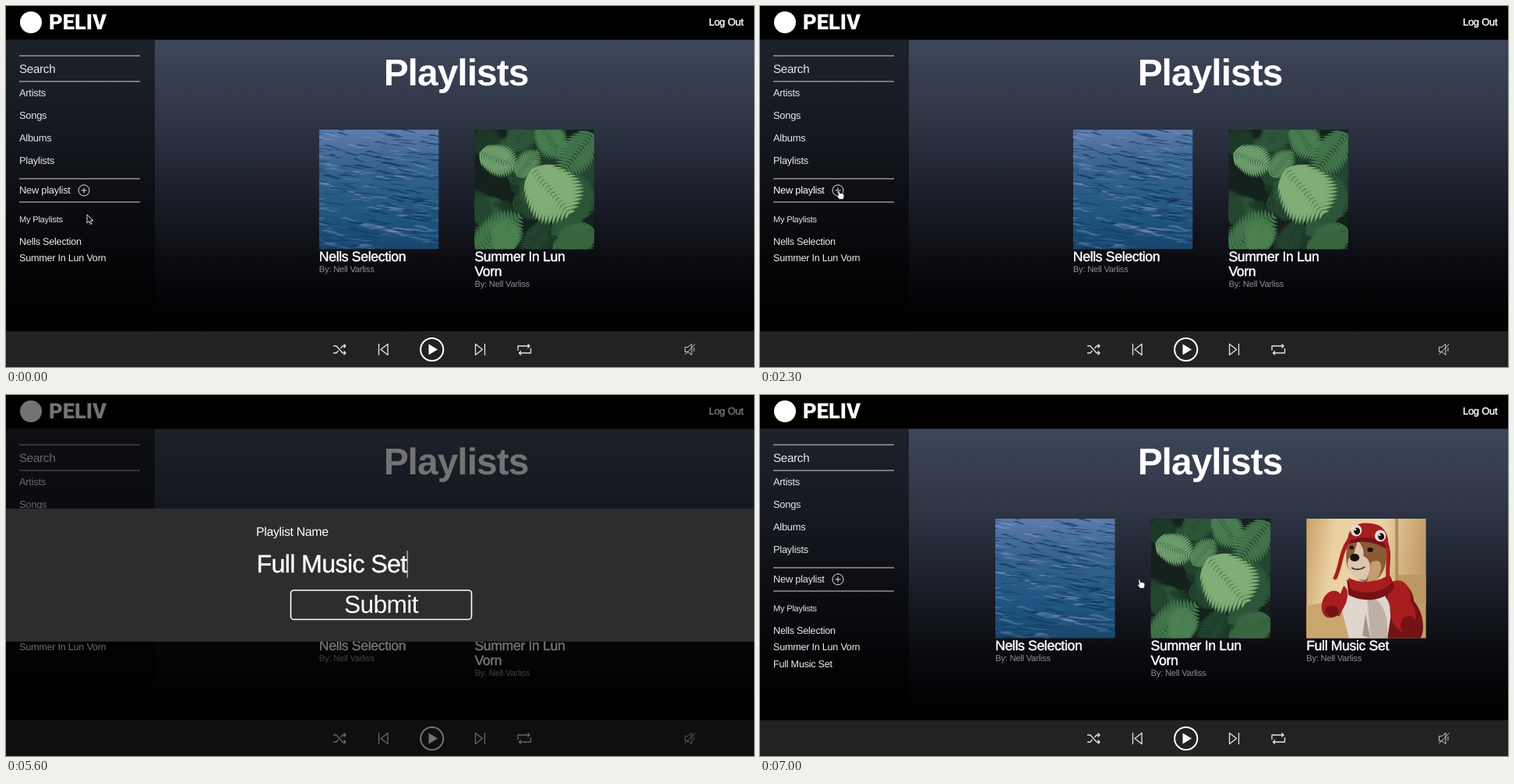
An HTML page that plays this animation: 960x464 px, repeating every 7100 ms.

```html
<!DOCTYPE html>
<html lang="en">
<head>
<meta charset="utf-8">
<title>Playlists</title>
<style>
html, body { margin: 0; width: 100%; height: 100%; overflow: hidden; background: #000; }
svg { display: block; }
text { font-family: "Liberation Sans", Arial, sans-serif; letter-spacing: -.02em; fill: #fff; white-space: pre; text-rendering: geometricPrecision; }
.nav { font-size: 12.9px; fill: #e6e6e6; }
.mine { font-size: 12.65px; fill: #ececec; }
.title { font-size: 17.65px; stroke: #fff; stroke-width: .45px; }
.by { font-size: 11.2px; fill: #8e8e91; }
.line { fill: none; stroke: #e6e6e6; stroke-width: 1.3; stroke-linejoin: round; }
</style>
</head>
<body>
<svg id="stage" width="960" height="464" viewBox="0 0 960 464"></svg>
<script>
const LOOP = 7100, OPEN = 2500, DONE = 6000;
const SIZE = 153.5;
const NAMES = ["Nells Selection", "Summer In Lun Vorn", "Full Music Set"];
const OWNER = "By: Nell Varliss";

let seed = 7;
const rnd = () => (seed = (seed * 16807) % 2147483647) / 2147483647;
const range = (n, fn) => Array.from({ length: n }, (_, i) => fn(i)).join("");
const text = (x, y, s, cls, extra = "") => `<text x="${x}" y="${y}" class="${cls}" ${extra}>${s}</text>`;
const path = (d, fill) => `<path d="${d}" fill="${fill}"/>`;
const oval = (x, y, rx, ry, fill, turn = 0) =>
  `<ellipse cx="${x}" cy="${y}" rx="${rx}" ry="${ry}" fill="${fill}" transform="rotate(${turn} ${x} ${y})"/>`;
const grad = (id, stops, attrs) => `<linearGradient id="${id}" ${attrs}>` +
  stops.map(([o, c]) => `<stop offset="${o}" stop-color="${c}"/>`).join("") + `</linearGradient>`;

// Long crooked ripples, growing larger towards the viewer
function sea() {
  const tones = ["#7f8fbd", "#123a60", "#5f7fae", "#143f66", "#0f3052", "#2d658f"];
  return `<rect width="154" height="154" fill="url(#sea)"/>` + range(300, i => {
    const y = i / 300 * 158, w = 12 + rnd() * 22 + y / 10, h = 1 + rnd() * (1.6 + y / 60);
    const x = rnd() * 180 - 30, k = (rnd() - .3) * 7;
    const tone = tones[Math.floor(rnd() * tones.length)];
    return `<path d="M${x} ${y}q${w * .2} ${-h} ${w * .5} ${k * .3}t${w * .5} ${k * .4}q${-w * .3} ${h * 1.6} ${-w * .55} ${h * .3 - k * .2}z" fill="${tone}" opacity="${(.8 - y / 480).toFixed(2)}"/>`;
  });
}

// A stem with paired, separate leaflets that taper towards the tip
function fern(x, y, turn, len, wide, fill) {
  const n = 15;
  const leaves = range(n, i => {
    const u = (i + .5) / n, size = wide * Math.pow(Math.sin(Math.PI * (.2 + u * .78)), .8);
    const t = len / n * .36, px = len * u;
    return [-1, 1].map(s =>
      `<path d="M${px - t} 0Q${px + size * .1 - t} ${s * size * .6} ${px + size * .55} ${s * size}Q${px + size * .25 + t} ${s * size * .5} ${px + t} 0"/>`).join("");
  });
  return `<g transform="translate(${x} ${y}) rotate(${turn})" fill="${fill}">${leaves}<path d="M0 0H${len}" stroke="${fill}" stroke-width="1"/></g>`;
}

function forest() {
  const back = range(30, i => fern(rnd() * 150, rnd() * 150, rnd() * 360, 38 + rnd() * 28, 15 + rnd() * 9,
    ["#24452f", "#2d5639", "#1d3a29"][i % 3]));
  return `<rect width="154" height="154" fill="#14211c"/>` + back +
    fern(152, 4, 128, 66, 25, "#41744a") + fern(84, -8, 58, 50, 22, "#477d4f") +
    fern(2, 155, -38, 72, 26, "#41744a") + fern(154, 128, 152, 50, 23, "#3a6a45") +
    fern(34, 160, -75, 46, 22, "#4b8051") + fern(100, 158, -20, 56, 22, "#38663f") +
    fern(6, 30, 20, 50, 22, "#6d9d6c") + fern(54, 60, -50, 42, 16, "#558859") +
    fern(74, 52, 48, 72, 38, "#3c6c43") + fern(73, 50, 50, 76, 39, "#82ad76");
}

function pup() {
  const red = "#a81d1e", dark = "#741216";
  const eye = (x, y) => oval(x, y, 7.2, 7.6, "#e6ddd2") + oval(x + 1, y + 1, 4, 4.4, "#15100e") + oval(x - 1, y - 1, 1.2, 1.2, "#fff");
  const feeler = d => `<path d="${d}" fill="none" stroke="${red}" stroke-width="5" stroke-linecap="round"/>`;
  return `<rect width="154" height="154" fill="url(#room)"/>` +
    path("M0 112L42 104L60 154H0Z", "#cba56e") +
    path("M114 0H118V110H114Z", "#b48b56") + path("M118 72H154V110H118Z", "#bd9662") +
    path("M104 84C118 76 136 84 138 106C152 122 152 146 146 154H92Z", dark) +
    path("M108 82C122 74 134 84 134 104L122 134L102 112Z", red) +
    path("M44 112C47 98 60 90 76 90C98 90 110 104 108 128L104 154H55Z", "#dfd6ce") +
    path("M78 100C94 102 106 116 104 154H82Z", "#bfb0a5") +
    path("M72 150L76 122L82 154Z", "#a69488") +
    path("M52 78C66 88 92 86 108 74L113 88C104 104 76 110 54 98Z", dark) +
    path("M54 76C70 84 92 82 106 72L110 82C98 96 72 98 56 90Z", red) +
    oval(33, 110, 13, 18, red, 18) + path("M21 108Q28 95 43 98L48 86Q56 92 51 108L42 126Z", red) +
    oval(33, 119, 9, 7, dark, 18) +
    oval(124, 122, 16, 25, red, -14) + oval(132, 138, 11, 13, dark, -14) +
    path("M53 30C62 22 88 20 100 32C107 48 101 68 91 78C80 85 63 81 57 67C50 62 50 48 53 30Z", "#8c5a33") +
    path("M66 28C73 36 74 42 73 48C84 52 84 66 77 78C66 81 58 74 56 66C50 58 53 50 61 45Z", "#dcc7ae") +
    path("M83 56C95 50 101 58 91 78L78 81Z", "#c39c70") +
    oval(62, 50, 6, 5, "#15100f") + oval(58, 37, 2.8, 2.6, "#1c110c") + oval(82, 40, 3.8, 3, "#1c110c") +
    `<path d="M58 63Q66 68 75 62" fill="none" stroke="#4b2c20" stroke-width="1.8"/>` +
    path("M53 31C52 12 66 3 82 6C99 7 107 19 105 38C96 28 70 24 53 31Z", red) +
    path("M55 29C72 20 93 24 104 36L105 41C94 31 70 26 54 33Z", dark) +
    feeler("M55 27C43 44 45 60 37 76") + feeler("M102 30C110 48 101 62 106 82") +
    eye(64, 15) + eye(95, 22);
}

function cover(i, art) {
  const lines = i === 1 ? ["Summer In Lun", "Vorn"] : [NAMES[i]];
  return `<g id="cover${i}"><svg width="${SIZE}" height="${SIZE}" overflow="hidden">${art}</svg>` +
    lines.map((s, k) => text(0, 169 + k * 19, s, "title")).join("") +
    text(0, 183 + (lines.length - 1) * 19, OWNER, "by") + `</g>`;
}

const sidebar = `<rect y="43.5" width="191" height="374.5" fill="#000" opacity=".52"/>` +
  [64, 97, 222, 252].map(y => `<path d="M17 ${y}H172" stroke="#d4d4d4"/>`).join("") +
  text(17, 86, "Search", "nav", `style="font-size:15.2px"`) +
  ["Artists", "Songs", "Albums", "Playlists"].map((s, i) => text(17, 116 + i * 29.1, s, "nav")).join("") +
  text(17, 241, "New playlist", "nav", `id="add"`) +
  `<circle cx="100" cy="237" r="7" class="line" style="stroke-width:1"/><path d="M96.5 237h7m-3.5-3.5v7" class="line" style="stroke-width:1"/>` +
  text(17, 278, "My Playlists", "nav", `style="font-size:11.1px"`) +
  NAMES.map((s, i) => text(17, 306.5 + i * 21.5, s, "mine", `id="mine${i}"`)).join("");

const player = `<rect y="418" width="960" height="46" fill="#222"/><g class="line">
  <path d="M420 437h4l8 9h4m-2.5-2.5l2.5 2.5-2.5 2.5M420 446h4l2.5-3m3-3l2.5-3h4m-2.5-2.5l2.5 2.5-2.5 2.5"/>
  <path d="M478.5 434v15M490 434.5v14l-9-7zM602.5 434.5v14l9-7zM614.5 434v15"/>
  <circle cx="546.7" cy="441.5" r="14.6" style="stroke-width:2;stroke:#fff"/>
  <path d="M657 443v-6h15m-2.5-2.5l2.5 2.5-2.5 2.5M673.5 440v6h-15m2.5-2.5l-2.5 2.5 2.5 2.5"/>
  <path d="M871.5 438.5h3.5l5-4v14l-5-4h-3.5zM871.5 448l13-13.5M883 439v5" style="stroke-width:1;stroke:#ccc"/></g>` +
  path("M542.5 434.5L554 441.5L542.5 448.5Z", "#fff");

const modal = `<g id="modal"><rect width="960" height="464" opacity=".55"/>
  <rect y="146" width="960" height="171" fill="#2d2d2d"/>` +
  text(321, 180.5, "Playlist Name", "", `font-size="15.85"`) +
  text(321.5, 228, "Start typing...", "", `id="hint" font-size="31.8" style="fill:#757575"`) +
  text(321.5, 228, "", "", `id="typed" font-size="32.2" stroke="#fff" stroke-width=".4"`) +
  `<rect id="caret" y="200" width="1" height="35" fill="#e8e8e8"/>
  <rect x="365.5" y="251" width="232" height="37.5" rx="4" fill="none" stroke="#fff" stroke-width="1.6"/>` +
  text(481.5, 280, "Submit", "", `font-size="31.7" text-anchor="middle"`) + `</g>`;

const pointers = `<g id="pointer">
  <path id="arrow" d="M0 0V11L2.6 8.7L4.4 12.6L6.2 11.8L4.5 8H8Z" fill="#111" stroke="#f2f2f2" stroke-width=".9"/>
  <path id="hand" d="M-1.5 .5Q-.3 -.6 .6 .8L1.7 4L3.4 3.5L5 4.2L6.6 4.6L7 8L5.8 11.5H.8L-2.4 7.4Q-2.6 6 -.5 6.6Z" fill="#fff" stroke="#111" stroke-width=".8"/>
  <path id="beam" d="M-2.5 -5.5Q0 -5.5 0 -4V4.5Q0 6 -2.5 6M2.5 -5.5Q0 -5.5 0 -4M0 4.5Q0 6 2.5 6M-1.5 1.5H1.5" fill="none" stroke="#c4c4c4" stroke-width="1"/></g>`;

const $ = id => document.getElementById(id);
$("stage").innerHTML = `<defs>` +
  grad("page", [[0, "#3d475b"], [.3, "#2d3343"], [.55, "#1a1d28"], [.77, "#0a0b0f"], [.93, "#020204"], [1, "#000"]], `x2="0" y2="1"`) +
  grad("sea", [[0, "#5f7cac"], [.3, "#37638f"], [.7, "#1f5580"], [1, "#18466c"]], `x2="0" y2="1"`) +
  grad("room", [[0, "#c99f66"], [.25, "#ead0a2"], [.6, "#ecd5aa"], [1, "#c39b66"]], `x2="1" y2=".15"`) +
  `</defs><rect width="960" height="464"/><rect y="43.5" width="960" height="374.5" fill="url(#page)"/>` +
  `<circle cx="32" cy="21" r="14" fill="#fff"/>` +
  text(55, 30, "PELIV", "", `style="font:900 27.3px Roboto,sans-serif;letter-spacing:0"`) +
  text(902, 25, "Log Out", "", `font-size="12.95" stroke="#fff" stroke-width=".4"`) +
  sidebar + text(577.5, 102, "Playlists", "", `font-size="47.9" font-weight="700" text-anchor="middle"`) +
  cover(0, sea()) + cover(1, forest()) + cover(2, pup()) + player + modal + pointers;

// When each letter of the new name arrives
const KEYS = [3500, 3700, 3900, 4000, 4200, 4300, 4600, 4800, 5100, 5300, 5300, 5400, 5400, 5600];
// time, x, y, pointer shape until the next entry
const TRACK = [
  [0, 104, 268, "arrow"], [1600, 104, 268, "arrow"], [1900, 101, 237, "hand"], [2600, 101, 237, "arrow"],
  [3200, 371, 216, "beam"], [3500, 371, 216, ""], [6600, 372, 222, "hand"], [7000, 487, 237, "hand"], [LOOP, 487, 237, "hand"]
];
const show = (id, on) => $(id).setAttribute("visibility", on ? "visible" : "hidden");

function draw(now) {
  const t = Math.floor(now % LOOP / 100) * 100;
  const done = t >= DONE, open = t >= OPEN && !done;

  for (let i = 0; i < 3; i++)
    $("cover" + i).setAttribute("transform", `translate(${(done ? 302 : 401.8) + i * 199.6} 159)`);
  show("cover2", done);
  show("mine2", done);
  $("add").style.fill = t >= 1900 && t < OPEN ? "#fff" : "";

  $("modal").style.display = open ? "" : "none";
  if (open) {
    const typed = $("typed");
    typed.textContent = NAMES[2].slice(0, KEYS.filter(k => k <= t).length);
    $("hint").style.display = typed.textContent ? "none" : "";
    $("caret").setAttribute("x", 321.5 + (typed.textContent ? typed.getComputedTextLength() : 0));
  }

  const k = TRACK.findIndex((p, i) => t < TRACK[i + 1][0]);
  const [a, x, y, kind] = TRACK[k], [b, x2, y2] = TRACK[k + 1], u = (t - a) / (b - a);
  $("pointer").setAttribute("transform", `translate(${x + (x2 - x) * u} ${y + (y2 - y) * u})`);
  for (const id of ["arrow", "hand", "beam"]) show(id, id === kind);
}

const start = performance.now();
function tick() {
  draw(performance.now() - start);
  requestAnimationFrame(tick);
}
tick();
</script>
</body>
</html>
```
